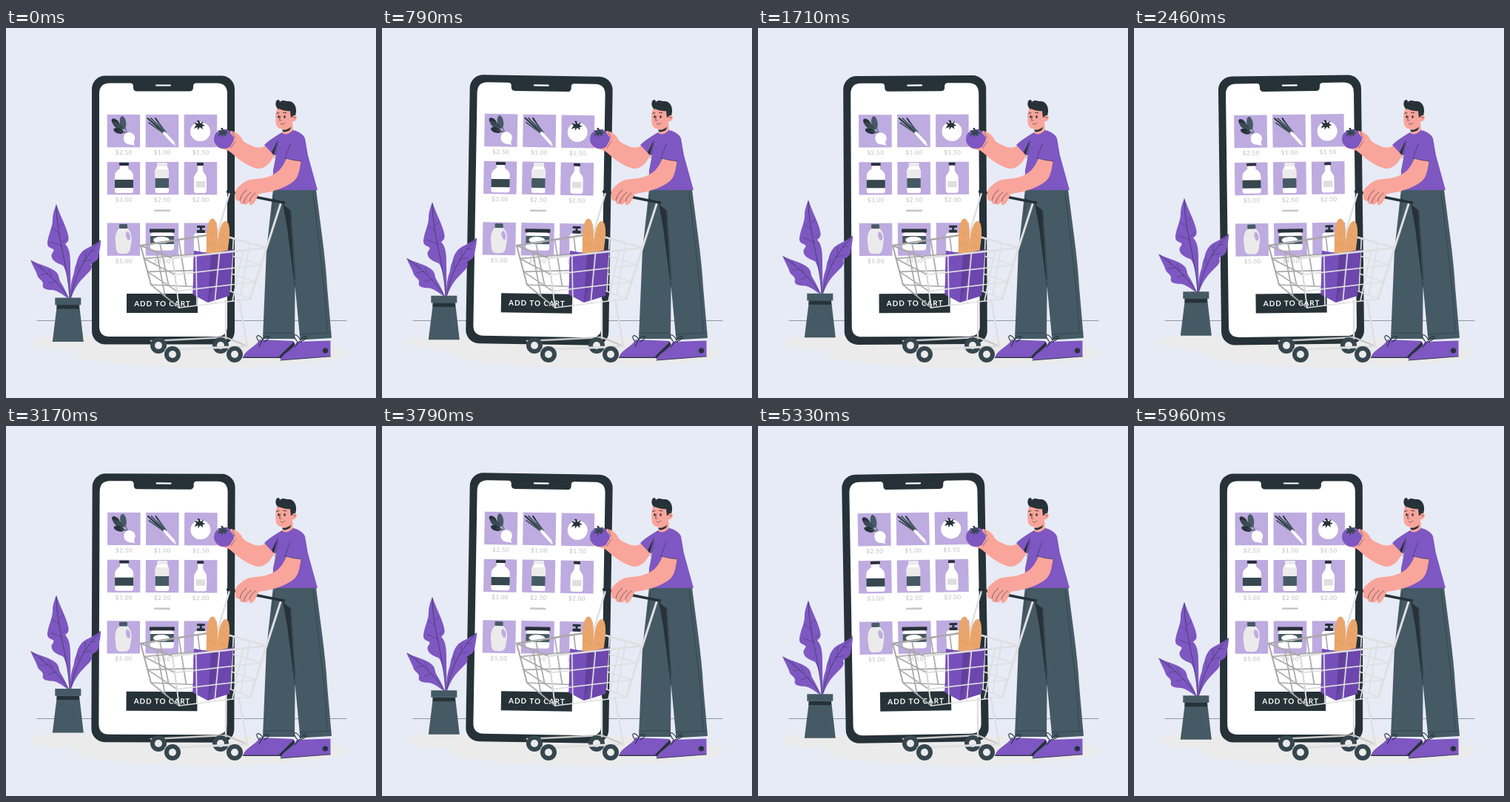
Animation, 500 px wide and 500 px high, one loop 6000 ms. Source, as an HTML page with a canvas:

```html
<!DOCTYPE html>
<html lang="en">
<head>
<meta charset="utf-8">
<title>Add to cart</title>
<style>
html, body { margin: 0; width: 100%; height: 100%; overflow: hidden; background: #e7ebf6; }
canvas { display: block; width: 100vw; height: 100vh; }
</style>
</head>
<body>
<canvas id="stage"></canvas>
<script>
const canvas = document.getElementById('stage');
const ctx = canvas.getContext('2d');
const INK = '#263238', DARK = '#37474f', SLATE = '#455a64', GRAPE = '#7e57c2', LILAC = '#beabe0';
const SKIN = '#f9a59b', GREY = '#c7c7c7', PALE = '#ebebeb', WIRE = '#dfdfdf', STEEL = '#a9a9a9';
const LOOP = 6000, FPS = 24;

const cache = new Map();
function path(d) {
  if (!cache.has(d)) cache.set(d, new Path2D(d));
  return cache.get(d);
}
function fill(color, d) {
  ctx.fillStyle = color;
  ctx.fill(path(d));
}
function line(color, width, d) {
  ctx.strokeStyle = color;
  ctx.lineWidth = width;
  ctx.stroke(path(d));
}
function box(color, x, y, w, h, r = 0) {
  ctx.fillStyle = color;
  ctx.beginPath();
  ctx.roundRect(x, y, w, h, r);
  ctx.fill();
}
function oval(color, x, y, rx, ry = rx, turn = 0) {
  ctx.fillStyle = color;
  ctx.beginPath();
  ctx.ellipse(x, y, rx, ry, turn, 0, Math.PI * 2);
  ctx.fill();
}
function label(text, x, y, font, color, gap) {
  ctx.font = font;
  ctx.fillStyle = color;
  ctx.textAlign = 'center';
  ctx.letterSpacing = gap + 'px';
  ctx.fillText(text, x + gap / 2, y);
}

function floor() {
  box('#e7ebf6', 0, 0, 500, 500);
  oval(PALE, 84, 425, 51, 10);
  oval(PALE, 276, 439, 184, 20);
  line(INK, 0.45, 'M42 395.500H460');
}

function tomato(color, leaf, x, y) {
  oval(color, x, y, 13.5, 13.1);
  ctx.save();
  ctx.translate(x - 1.5, y - 9);
  fill(leaf, 'M-1 -2L-3 -6L0 -6L1.500 -2L6 -5L4 -1L8 1L4 2L5 6L1 3L-2 7L-2 3L-7 5L-4 0L-7 -3Z');
  ctx.restore();
}

function vegetables() {
  oval(INK, 148, 127.5, 3.7, 6.5, -0.8);
  oval(SLATE, 158, 128, 4.2, 9, -0.15);
  oval(DARK, 151, 132, 3.6, 8, -0.95);
  oval(INK, 152, 139, 3.4, 7, -1.25);
  line(SLATE, 1, 'M150 131L163 143M160 133L164 142M153 139L163 142');
  fill('#fff', 'M162 142C168 139 176 144 174 151C172 154 173 156 174 159C171 157 168 158 165 157C158 155 157 146 162 142Z');

  line(INK, 2, 'M191.500 122L214 142M202 122L215 141');
  line(SLATE, 2, 'M196 122L214.500 141M193 128L213 142M206 128L216 141');
  line('#fff', 4, 'M214 142L226 155');
  line('#fff', 1, 'M226 155L229 158M225 155L228 159');

  tomato('#fff', INK, 262.5, 140);
}

function bottles() {
  box(INK, 153, 182, 13, 4, 1);
  fill('#fff', 'M154 186H165V190C169 193 172 195 172 200V220Q172 223 169 223H150Q147 223 147 220V200C147 195 150 193 154 190Z');
  box(DARK, 147, 205, 25, 11);

  box(PALE, 204, 182, 14, 5, 1);
  fill('#fff', 'M204 187H218L220 193V220Q220 223 218 223H204Q201.500 223 201.500 220V193Z');
  box(PALE, 201.5, 191, 18.5, 12);
  box(SLATE, 201.5, 203, 18.5, 13);

  box(INK, 258, 182, 9, 4, 1);
  fill('#fff', 'M259 186H266V192C267 197 271 198 271 203V220Q271 223 268 223H257Q254 223 254 220V203C254 198 258 197 259 192Z');
  box(WIRE, 256.5, 207, 12.5, 8.5);
}

function household() {
  box(SLATE, 153, 265, 11, 6, 1);
  fill(PALE, 'M153 271H164C169 274 171 283 169 291C168 298 168 304 162 305H154C148 304 149 297 148 291C147 284 148 275 153 271Z');
  oval(LILAC, 165, 281, 2.8, 6, -0.25);

  box(INK, 194, 271.5, 34, 5, 1);
  box('#fff', 195, 276.5, 32, 24, 4);
  box(SLATE, 195, 281, 32, 11);
  oval('#fff', 210, 286.5, 11, 4.5);

  box(INK, 258, 267, 11, 3, 1);
  box(INK, 262, 268, 3, 6);
  box(INK, 258, 273, 11, 4, 1);
  box('#fff', 254, 277, 19, 28, 4);
}

function phone(angle) {
  ctx.save();
  ctx.translate(212.5, 246);
  ctx.rotate(angle * Math.PI / 180);
  ctx.translate(-212.5, -246);
  box(INK, 116, 64.5, 193, 363, 18);
  fill('#fff', 'M140 74.500H168Q171.500 74.500 172 78V81Q172.500 85.500 177 85.500H248Q252.500 85.500 253 81V78Q253.500 74.500 257 74.500H285Q299 74.500 299 89V403Q299 417 285 417H140Q126 417 126 403V89Q126 74.500 140 74.500Z');
  box('#fff', 202, 76.4, 21, 2.2, 1.1);
  const rows = [[117, '$2.50', '$1.00', '$1.50'], [181, '$3.00', '$2.50', '$2.00'], [263.5, '$5.00', '$4.50', '$3.50']];
  for (const [y, ...prices] of rows) {
    prices.forEach((price, i) => {
      box(LILAC, 136.7 + i * 52, y, 44.5, 44.2);
      label(price, 159 + i * 52, y + 54, '400 8px Lato, sans-serif', '#bdbdbd', 0.5);
    });
  }
  vegetables();
  bottles();
  household();
  box(GREY, 200, 245.5, 22, 2.6, 1.2);
  box(INK, 163, 359, 96, 26);
  label('ADD TO CART', 211, 375.5, '700 10px Lato, sans-serif', '#fff', 0.9);
  ctx.restore();
}

function plant(dy) {
  ctx.save();
  ctx.translate(0, dy);
  fill(GRAPE, 'M68 238C74 256 83 271 84.500 283C85 289 82 290 80 292C87 299 87 311 87 323L87.500 366H85.500C85 345 82 328 77 321C70 318 62 315 61.500 308C61 304 66 302 64 299C60 297 55 296 56 289C58 276 63 269 63 259C63 251 66 244 68 238Z');
  fill(GRAPE, 'M33 313.500C44 320 60 322 68 330C72 334 71 338 73 342C78 350 82 358 85 366C77 361 71 355 62 354C54 354 48 352 50 346C50 341 45 340 43 336C41 329 36 321 33 313.500Z');
  fill(GRAPE, 'M128 286C128 296 126 301 125 309C124 315 118 316 115 319C118 325 113 329 107 335C100 342 93 350 88 365H86.500C87 352 88 342 91 334C93 328 92 325 95 319C97 311 98 308 103 302C110 296 120 294 128 286Z');
  line(INK, 0.6, 'M68 240C68 280 83 317 86 365M35 315C54 329 73 346 84 364M127 288C107 308 93 334 88 362');
  line(INK, 0.4, 'M71 277L62 270M76 295L61 289M72 269L77 265M77 289L82 284M50 327L46 321M62 336L58 327M57 332L47 333M68 342L58 345M115 301L121 301M104 315L116 313M107 311L107 302M98 326L97 318');
  fill(SLATE, 'M69 374H99L104.800 424H62.800Z');
  box(INK, 68.5, 374, 30.5, 5.5);
  box(SLATE, 66.3, 364.5, 35, 9.7);
  ctx.restore();
}

const mix = (a, b, k) => [a[0] + (b[0] - a[0]) * k, a[1] + (b[1] - a[1]) * k];
function mesh(color, a, b, c, d, cols, rows) {
  const rule = (p, q, w) => {
    ctx.lineWidth = w;
    ctx.beginPath();
    ctx.moveTo(...p);
    ctx.lineTo(...q);
    ctx.stroke();
  };
  ctx.strokeStyle = color;
  for (let i = 0; i <= cols; i++) rule(mix(a, b, i / cols), mix(d, c, i / cols), 1.7);
  for (let i = 0; i <= rows; i++) rule(mix(a, d, i / rows), mix(b, c, i / rows), i ? 1.7 : 2.4);
}
// Basket corners: back/front, left/right, top/bottom
const BLT = [182, 294], BRT = [285, 278], FRT = [352, 297], FLT = [225, 311];
const BLB = [196, 347], BRB = [291, 351], FRB = [330, 366], FLB = [234, 378];

function wheel(x, y) {
  oval(DARK, x, y, 11);
  oval(PALE, x, y, 5);
}

function loaf(x, y, turn, h) {
  ctx.save();
  ctx.translate(x, y);
  ctx.rotate(turn);
  fill('#e9a56c', `M0 0C5 0 7.500 12 7.500 23V${h}H-7.500V23C-7.500 12 -5 0 0 0Z`);
  line('#d08f57', 0.6, 'M-3 19Q1 20 3 23M-4 33Q0 34 4 37');
  ctx.restore();
}

function cart() {
  line(WIRE, 2.4, 'M302 223L284 283M297 368V420M315 367L326 430');
  line(GREY, 2.4, 'M196 423L297 418M297 418L326 430');
  mesh(STEEL, BLT, BRT, BRB, BLB, 4, 3);
  mesh(WIRE, BRT, FRT, FRB, BRB, 3, 3);

  loaf(279, 257.5, 0.02, 52);
  loaf(297, 261, 0.12, 48);
  fill('#6d47ae', 'M254 301L277 305L307 299L302 362L273 371L252.500 360Z');
  fill('#774fba', 'M254 301L277 305L273 371L252.500 360Z');
  fill('#60409a', 'M277 305L286 304L283 338L273 371Z');

  mesh(STEEL, BLT, FLT, FLB, BLB, 2, 3);
  mesh(WIRE, FLT, FRT, FRB, FLB, 4, 3);
  line(WIRE, 3, 'M371 238L352 297L330 366');
  wheel(206, 429);
  wheel(290, 429);
  line(WIRE, 3, 'M216 435L326 430');
  wheel(225, 441);
  wheel(309, 441);
}

function legs() {
  fill(GRAPE, 'M320.500 444C325 434 337 431 343 421L388 423C392 427 389 435 391 440L372 446H321Z');
  line(INK, 1.2, 'M320.500 445.300H373');
  fill(INK, 'M389 424L391 430L382 439L371 447L369 444Z');
  fill(GRAPE, 'M371 448C374 439 387 436 393 424L438.500 422.500V444L372 449Z');
  line(INK, 0.8, 'M371 449L438.500 443.800');
  oval(INK, 431.5, 436, 3.6);

  fill(SLATE, 'M361 218H400L391 300L390 420H347L352 300Z');
  fill(INK, 'M374 237L386 244L393 360L390 348L380 270Z');
  fill(SLATE, 'M378 218H419C424 260 432 310 434 350L440 419L397.500 421.500L390 342L384 246L374 238Z');
  line(INK, 0.5, 'M348 412H389M397 414L439 412M415 222C421 280 431 345 434 411M363 225L360 252');
  line(INK, 0.6, 'M385 246L391 340');
  line(INK, 1.1, 'M342 424C334 414 343 413 347 421C352 413 362 417 349 424M347 421L342 430M394 424C384 413 393 411 398 422C405 412 412 418 398 424M397 423L390 431');
}

function head() {
  fill(SKIN, 'M373 132L387 123L388 142Q380 150 374 143Z');
  fill(INK, 'M373.500 137.500Q380 138.500 385.500 133.500L383.500 138Q378 141.500 374 140Z');
  fill(SKIN, 'M366 109C364 115 364 124 365 130C367 138 377 138 383 133L387 126C392 128 395 119 391 117L390 106Z');
  fill(INK, 'M367 109C363 105 364 97 368 97C369 97 370 98 370 100C374 96 378 99 381 99C388 98 393 105 392 114L391 118C388 117 387 121 385 121L384 112C378 113 372 110 367 109Z');
  line(INK, 0.9, 'M365.500 115.500L369 114.500M374.500 114.500Q377 113 379 115');
  oval(INK, 368.5, 120, 1.2, 1.9);
  oval(INK, 376.5, 120, 1.2, 1.9);
  line(INK, 0.6, 'M371 119L369.500 125H372M371 129Q374 132 377 128M388 121Q391 119 391 122');
}

function torso() {
  // Raised arm
  fill(SKIN, 'M282 157C286 163 295 164 301 166C309 172 321 185 339 190C351 191 358 181 364 170L352 158C348 161 342 163 334 160C326 157 320 153 318 149C314 144 307 139 303 139L304 150Z');
  tomato(GRAPE, DARK, 294.5, 150);
  fill(SKIN, 'M303 140C309 139 316 144 319 150L315 160C311 158 306 158 303 162C304 156 309 152 309 149C308 146 303 144 303 140Z');
  line(INK, 0.5, 'M304 162Q307 156 311 153M306 141Q308 146 310 149');

  head();
  fill(GRAPE, 'M373 141C377 146 383 143 388 138C396 140 402 144 404 149L408 172L421 219H360.500L361 192L365 172L361 171L349 158C356 151 365 146 373 141Z');
  fill(INK, 'M367 152L362 172L359 168Z');
  line(INK, 0.5, 'M367 152Q367 162 363 176M384 160Q380 167 379 178M399 178C398 186 395 194 393 199');

  line(INK, 3.6, 'M300 221L375 236');
  oval(INK, 300, 221, 2);
  oval(INK, 375, 236, 2.2);
  // Near arm and fingers around the handle
  fill(SKIN, 'M379 176L399 178C397 190 396 201 389 207C377 217 357 222 342 224C338 230 336 238 332 239C328 240 328 236 329 234C326 239 323 240 321 237C318 239 315 237 316 233C312 235 309 231 310 226C308 218 315 214 321 209C331 202 344 205 354 201C366 197 373 191 379 176Z');
  line(INK, 0.6, 'M316 233Q318 224 325 219M321 237Q323 228 331 222M329 234Q331 227 337 223');
  fill(GRAPE, 'M384 153C391 145 403 149 403 158L399 180Q387 179 377 176Z');
  line(INK, 0.5, 'M377 176Q388 179 399 180M384 157L377 176');
}

function draw(t) {
  const w = Math.round(innerWidth * devicePixelRatio);
  const h = Math.round(innerHeight * devicePixelRatio);
  if (canvas.width !== w || canvas.height !== h) {
    canvas.width = w;
    canvas.height = h;
  }
  ctx.setTransform(w / 500, 0, 0, h / 500, 0, 0);
  ctx.lineCap = ctx.lineJoin = 'round';
  // Phone rocks by one degree every half loop; plant rises 10 px and returns
  const p = (t / 3000) % 1;
  const sway = p < 0.25 ? p * 4 : p < 0.75 ? 2 - p * 4 : p * 4 - 4;
  const lift = 10 * (1 - Math.abs(1 - t / 3000));
  floor();
  phone(sway);
  plant(-lift);
  legs();
  cart();
  torso();
}

const start = performance.now();
function tick() {
  const t = (performance.now() - start) % LOOP;
  draw(Math.floor((t + 2) * FPS / 1000) * 1000 / FPS % LOOP);
  requestAnimationFrame(tick);
}
tick();
</script>
</body>
</html>
```
